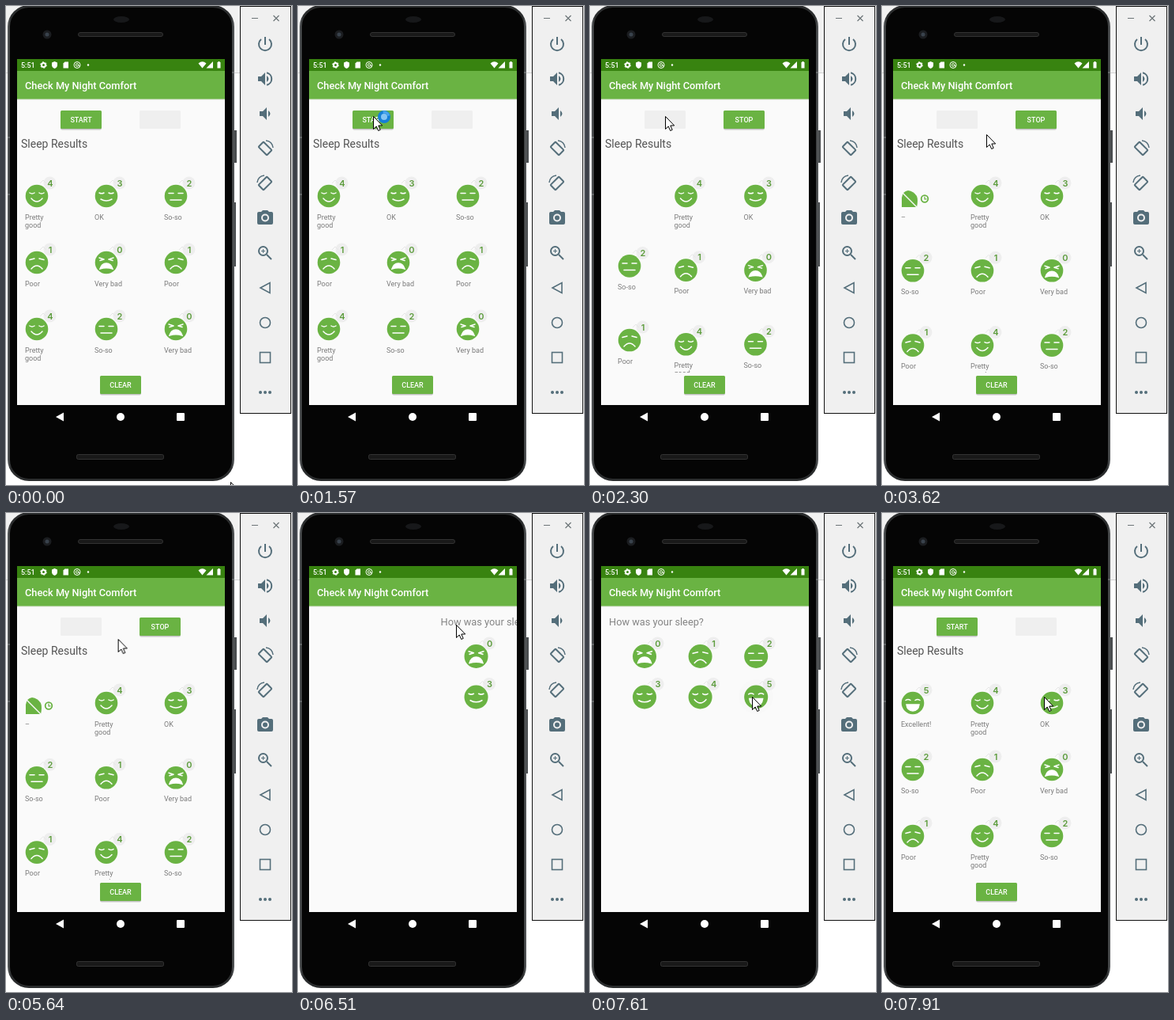
These frames come from a looping animation (362x605 px, 8000 ms). An HTML page:

```html
<!DOCTYPE html>
<html lang="en">
<head>
<meta charset="utf-8">
<title>Check My Night Comfort</title>
<style>
html, body { margin: 0; width: 362px; height: 605px; overflow: hidden; background: #fff; }
svg { display: block; font-family: Roboto, "Noto Sans", sans-serif; }
.title { font: 500 12.8px Roboto, sans-serif; fill: #fff; }
.clock { font: 500 9px Roboto, sans-serif; fill: #fff; }
.btn { font: 500 9px Roboto, sans-serif; fill: #fff; text-anchor: middle; }
.heading { font-size: 14px; fill: #545454; }
.question { font-size: 12.8px; fill: #848484; }
.label { font-size: 9px; fill: #7b7b7b; }
.score { font: 600 11px Inter, sans-serif; fill: #5c9c3c; text-anchor: middle; }
.line { fill: none; stroke: #fff; stroke-width: 1.5; stroke-linecap: round; }
.tool { fill: none; stroke: #546e7a; stroke-width: 2; }
.tool .solid { fill: #546e7a; stroke: none; }

/* One cycle is 8 s; step-end marks hard cuts. */
.cut { animation: 8s step-end infinite; }
.ease { animation: 8s cubic-bezier(.37, 0, .63, 1) infinite; }
.tracker { animation-name: tracker; }
.idle { animation-name: idle; }
.running { animation-name: running; }
.before { animation-name: before; }
.move { animation-name: move; }
.active { animation-name: active; }
.after { animation-name: after; }
.quality { animation-name: quality; }
.slide { animation-name: slide; }
.press-start { animation-name: press-start; }
.press-stop { animation-name: press-stop; }
.press-face { animation-name: press-face; }
.busy { animation-name: busy; }
.cursor { animation-name: cursor; }
.spin { animation: spin .8s linear infinite; }

@keyframes tracker { 0%, 96.1% { visibility: visible } 78.09% { visibility: hidden } }
@keyframes idle { 0%, 96.1% { opacity: 1 } 24% { opacity: 0 } }
@keyframes running { 0%, 96.1% { opacity: 0 } 24% { opacity: 1 } }
@keyframes before { 0% { opacity: 1 } 78.09%, 100% { opacity: 0 } }
@keyframes move {
  0%, 24.7% { transform: none }
  29.55%, 100% { transform: translate(var(--dx), var(--dy)) }
}
@keyframes active { 0%, 29.75% { opacity: 0 } 30.75%, 100% { opacity: 1 } }
@keyframes after { 0%, 97% { opacity: 0 } 98.7%, 100% { opacity: 1 } }
@keyframes quality { 0%, 96.1% { visibility: hidden } 78.09% { visibility: visible } }
@keyframes slide {
  0%, 78.09% { transform: translate(263px, 0) }
  85.59%, 100% { transform: none }
}
@keyframes press-start { 0%, 20.9% { opacity: 0 } 22.5% { opacity: .25 } 24%, 100% { opacity: 0 } }
@keyframes press-stop { 0%, 75.4% { opacity: 0 } 77% { opacity: .25 } 78.09%, 100% { opacity: 0 } }
@keyframes press-face { 0%, 95% { opacity: 0 } 96%, 100% { opacity: .12 } }
@keyframes busy { 0%, 24% { opacity: 0 } 19.6% { opacity: 1 } }
@keyframes spin { to { transform: rotate(360deg) } }
@keyframes cursor {
  0%, .5% { transform: translate(284px, 601px); animation-timing-function: ease-in }
  2.6% { transform: translate(150px, 330px); animation-timing-function: linear }
  3.5% { transform: translate(128px, 313px) }
  4.3%, 7.5% { transform: translate(122px, 357px) }
  13.1%, 38.6% { transform: translate(95px, 139px) }
  45.2%, 69.6% { transform: translate(132px, 162px) }
  73.3%, 86.9% { transform: translate(200px, 141px) }
  91.2%, 100% { transform: translate(205px, 232px) }
}
</style>
</head>
<body>
<svg width="362" height="605" viewBox="0 0 362 605">
  <defs>
    <clipPath id="screen"><rect x="14" y="67" width="263" height="437"/></clipPath>
    <clipPath id="grid"><rect x="14" y="200" width="263" height="263"/></clipPath>
    <linearGradient id="rim">
      <stop offset="0" stop-color="#5b5e60"/><stop offset=".015" stop-color="#2b2d2e"/>
      <stop offset=".985" stop-color="#2b2d2e"/><stop offset="1" stop-color="#5b5e60"/>
    </linearGradient>
  </defs>

  <!-- Phone body -->
  <path d="M0 0H296V84H0z" fill="#f1f1f1"/>
  <path d="M0 84.5H296" stroke="#d2d2d2"/>
  <path d="M288 157h4v41h-4zM287 248h4v81h-4z" fill="#4a4d4f"/>
  <rect x="2" y="-1" width="287" height="601" rx="27" fill="url(#rim)"/>
  <rect x="5" y="2" width="281" height="595" rx="24" fill="#050505"/>
  <path d="M2 166h3M2 238h3M286 84h3" stroke="#8a8d8f"/>
  <ellipse cx="146" cy="17" rx="10" ry="4" fill="#17181a"/>
  <g fill="#191919" stroke="#333">
    <rect x="91.500" y="33.500" width="107" height="5" rx="2.500"/>
    <rect x="89.500" y="566.500" width="110" height="6" rx="2"/>
  </g>
  <circle cx="52" cy="36" r="5.500" fill="#1b1d20"/>
  <circle cx="52" cy="36" r="2.500" fill="#39424c"/>

  <!-- Screen -->
  <path d="M14 67H277V504H14z" fill="#fafafa"/>
  <path d="M14 117H277v1.500H14z" fill="#d9e2d4"/>
  <path d="M14 67H277V82H14z" fill="#388310"/>
  <path d="M14 82H277V117.500H14z" fill="#6ab343"/>
  <text class="clock" x="19" y="77.500">5:51</text>
  <text class="title" x="24" y="105">Check My Night Comfort</text>
  <g fill="#fff">
    <circle cx="47.500" cy="74.500" r="2.500" fill="none" stroke="#fff" stroke-width="2"/>
    <circle cx="47.500" cy="74.500" r="3.900" fill="none" stroke="#fff" stroke-dasharray="2 2.080"/>
    <path d="M58 71.500l3.500-1.500 3.500 1.500v3q0 3-3.500 4.500-3.500-1.500-3.500-4.500z"/>
    <path d="M74.500 70.500H79v8h-6.500v-6z"/>
    <circle cx="90" cy="74.500" r="4" fill="none" stroke="#fff"/>
    <circle cx="90" cy="74.500" r="1.700" fill="none" stroke="#fff"/>
    <path d="M91.500 74.500q1 2.500 2.500 1" fill="none" stroke="#fff"/>
    <circle cx="104" cy="74.500" r="1.200"/>
    <path d="M243.500 72.500q5-4.500 10 0l-5 6z"/>
    <path d="M262 70v8.500h-8.500z"/>
    <path d="M267.500 71h1v-1h2v1h1v7.500h-4z"/>
  </g>
  <g fill="#fff">
    <path d="M63 519l10-5.500v11z"/>
    <circle cx="145" cy="519" r="5"/>
    <rect x="216" y="514" width="10" height="10" rx="1"/>
  </g>

  <g clip-path="url(#screen)">
    <g class="tracker cut">
      <g id="buttons"></g>
      <text class="heading" x="19" y="179">Sleep Results</text>
      <g clip-path="url(#grid)">
        <g id="before" class="before cut"></g>
        <g id="after" class="after ease"></g>
      </g>
    </g>
    <g class="quality cut">
      <g class="slide ease">
        <text class="question" x="24" y="141.500">How was your sleep?</text>
        <g id="choices"></g>
        <circle class="press-face ease" cx="210" cy="232" r="22"/>
      </g>
    </g>
  </g>

  <!-- Side toolbar -->
  <rect x="296.500" y=".5" width="64" height="514" fill="#f0f0f0" stroke="#111"/>
  <path d="M311 15.500h8M338.500 12l7 7m0-7l-7 7" stroke="#6d7578" stroke-width="1.200"/>
  <g class="tool" id="tools"></g>

  <g class="cursor ease">
    <path d="M.5 .5V16.500L4.200 13 6.700 18.500 9.200 17.400 6.800 12H11.700z" fill="#fff" stroke="#000"/>
    <g class="busy cut">
      <g transform="translate(14 1)">
        <circle r="6" fill="#86c5f3" stroke="#167fd8" stroke-width="4"/>
        <path class="spin" d="M0-6A6 6 0 0 1 6 0" fill="none" stroke="#4da8ee" stroke-width="3"/>
      </g>
    </g>
  </g>
</svg>
<script>
const GREEN = '#6ab343';
const LABELS = [['Very bad'], ['Poor'], ['So-so'], ['OK'], ['Pretty', 'good'], ['Excellent!']];
const EYES = [
  'M-9-6L-3-4M-8-2.500L-3-4M9-6L3-4M8-2.500L3-4',
  'M-9-3.500L-3-5M9-3.500L3-5',
  'M-9-3.500h6M3-3.500h6',
  'M-9-4q3 1.500 6 0M3-4q3 1.500 6 0',
  'M-9-4q3 2 6 0M3-4q3 2 6 0',
  'M-9-3.500q3-2 6 0M3-3.500q3-2 6 0'
];
const MOUTHS = [
  'M-8 8Q-6 1 0 1T8 8Q0 5.500-8 8z',
  'M-7 8Q0 0 7 8',
  'M-7 5H7',
  'M-7 4Q0 8 7 4',
  'M-7 3Q0 11 7 3',
  'M-8 2H8Q7 10 0 10T-8 2z'
];

const put = (id, markup) => { document.getElementById(id).innerHTML = markup; };
const at = (x, y, markup) => `<g transform="translate(${x} ${y})">${markup}</g>`;
const cell = (i, pitch) => [39 + 88 * (i % 3), 240 + pitch * Math.floor(i / 3)];

function face(score, scale = 1) {
  const open = score % 5 === 0 ? ' style="fill:#fff"' : '';
  return `<circle cx="16.500" cy="-16.500" r="8" fill="#eeeeee"/>
    <path d="M4-16l4-4 4 4" fill="none" stroke="#e6e6e6"/>
    <g transform="scale(${scale})"><circle r="14.300" fill="${GREEN}"/>
    <path class="line" d="${EYES[score]}"/><path class="line" d="${MOUTHS[score]}"${open}/></g>
    <text class="score" x="17" y="-12.500">${score}</text>`;
}

const entry = score => face(score) + LABELS[score].map((word, n) =>
  `<text class="label" x="-15" y="${29.5 + 10.5 * n}">${word}</text>`).join('');

function button(x, y, text, enabled, press = '') {
  if (!enabled) return `<rect x="${x}" y="${y}" width="52" height="23" rx="1.500" fill="#efefef"/>`;
  return `<rect x="${x}" y="${y + 1.5}" width="52" height="23" rx="2" fill="#000" opacity=".22"/>
    <rect x="${x}" y="${y}" width="52" height="23" rx="1.500" fill="${GREEN}"/>
    <text class="btn" x="${x + 26}" y="${y + 14.8}">${text}</text>
    <rect class="${press} ease" x="${x}" y="${y}" width="52" height="23" fill="#fff" opacity="0"/>`;
}

put('buttons',
  `<g class="idle cut">${button(69, 132, 'START', true, 'press-start')}${button(169, 132, 'STOP', false)}</g>
   <g class="running cut">${button(69, 132, 'START', false)}${button(169, 132, 'STOP', true, 'press-stop')}</g>`
  + button(119, 467, 'CLEAR', true));

const active = at(39, 240,
  `<path d="M-14 14V2Q-13-6-6-7Q1-6 5 0Q7 5 5 14z" fill="${GREEN}"/>
   <path d="M-14-5L5 14" stroke="#fafafa" stroke-width="1.500"/>
   <circle cx="15" cy="3.500" r="4.300" fill="#fafafa" stroke="${GREEN}" stroke-width="1.800"/>
   <path d="M15 .8V3.800h2.500" fill="none" stroke="${GREEN}" stroke-width="1.200"/>
   <text class="label" x="-15" y="29.500">–</text>`);

// Every entry shifts one cell on when a new one is inserted.
put('before', [4, 3, 2, 1, 0, 1, 4, 2, 0].map((score, i) => {
  const [x, y] = cell(i, 84), [nx, ny] = cell(i + 1, 94.3);
  return `<g class="move ease" style="--dx:${nx - x}px;--dy:${ny - y}px">${at(x, y, entry(score))}</g>`;
}).join('') + `<g class="active ease">${active}</g>`);

put('after', [5, 4, 3, 2, 1, 0, 1, 4, 2].map((score, i) => at(...cell(i, 84), entry(score))).join(''));

put('choices', LABELS.map((_, i) =>
  at(69 + 70.6 * (i % 3), 181 + 51.5 * Math.floor(i / 3), face(i, 1.05))).join(''));

const speaker = '<path class="solid" d="M-9-3h4l5-5V8l-5-5h-4z"/>';
const rotate = `<rect x="-4.500" y="-7.500" width="9" height="15" rx="1" transform="rotate(-45)"/>
  <path d="M1-10Q9-9 10-1" stroke-width="1.500"/>`;
put('tools', [
  '<path d="M0-9V1M-5-6A8 8 0 1 0 5-6"/>',
  speaker + '<path class="solid" d="M2-4q5 4 0 8z"/><path d="M2-7.800A8 8 0 0 1 2 7.800"/>',
  at(2, 0, speaker) + '<path class="solid" d="M4-4q5 4 0 8z"/>',
  rotate,
  `<g transform="scale(-1 1)">${rotate}</g>`,
  `<path class="solid" d="M-3-10H3l2 2h3q2 0 2 2V6q0 2-2 2H-8q-2 0-2-2V-6q0-2 2-2h3z"/>
   <circle r="4" cy="-.5" stroke="#f0f0f0"/>`,
  '<circle cx="-2.500" cy="-2.500" r="5.500"/><path d="M2 2l6 6"/><path d="M-5-2.500h5M-2.500-5v5" stroke-width="1"/>',
  '<path d="M-6 0L6-6.500V6.500z" stroke-width="1.600"/>',
  '<circle r="6.500" stroke-width="1.600"/>',
  '<rect x="-6.500" y="-6.500" width="13" height="13" stroke-width="1.600"/>',
  [-6, 0, 6].map(x => `<circle class="solid" cx="${x}" r="2"/>`).join('')
].map((icon, i) => at(328, 48 + 44 * i, icon)).join(''));
</script>
</body>
</html>
```
